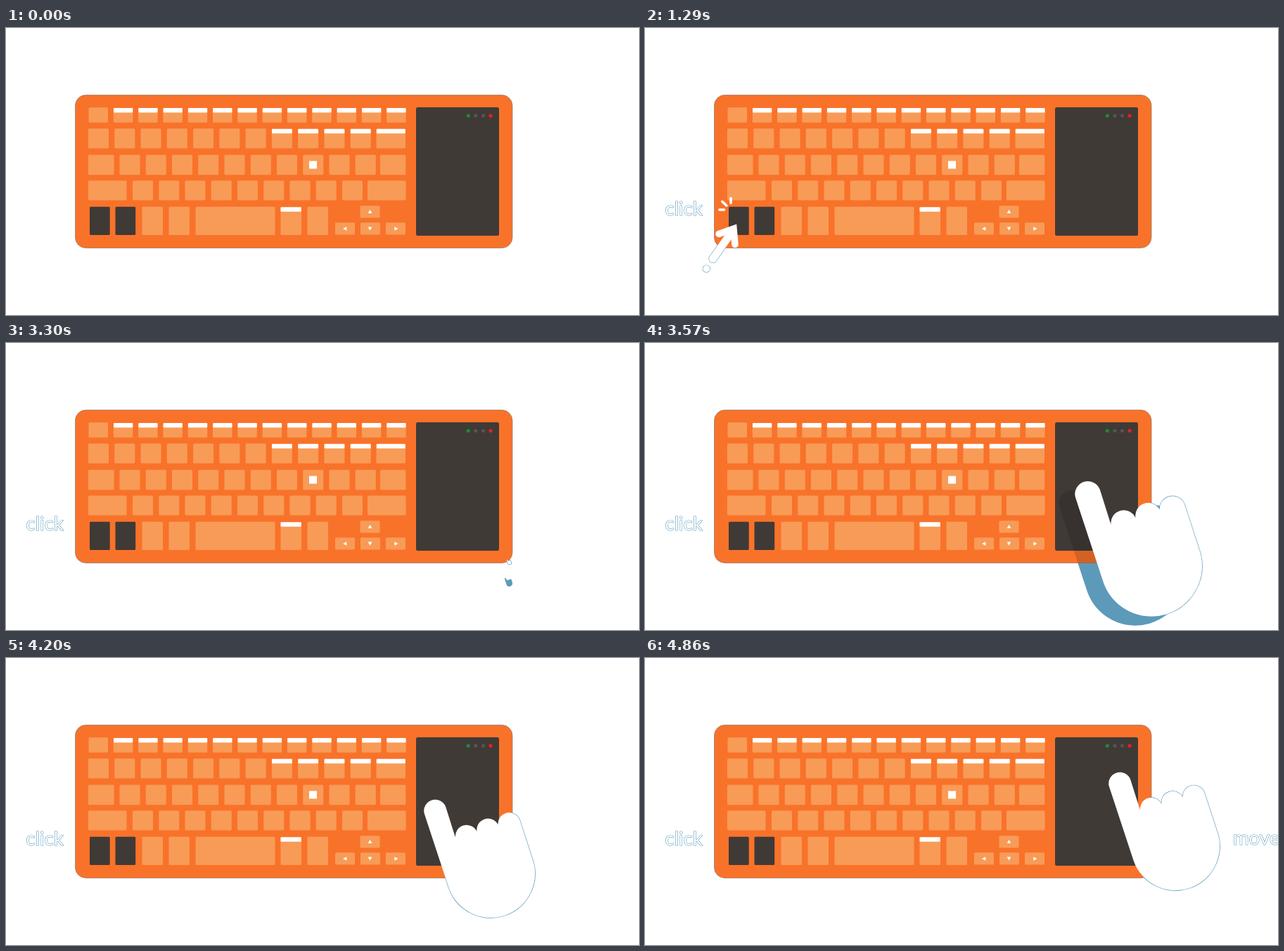
An HTML page for the animation above (5520 ms loop, 900x409 px).

```html
<!DOCTYPE html>
<html lang="en">
<head>
<meta charset="utf-8">
<title>Keyboard: click and move</title>
<style>
  html, body { margin: 0; width: 100%; height: 100%; overflow: hidden; background: #fff; }
  svg { display: block; width: 900px; height: 409px; }
  text { font: 27.5px Lato, sans-serif; fill: #fff; stroke: #5b9abd; stroke-width: 1.1px; paint-order: stroke; }
  .white { --grow: 0px; color: #fff; }
  .edge { --grow: 1.2px; color: #5b9abd; }
  .edge.hand, .white.hand { fill: currentColor; stroke: currentColor; }
  .edge.hand { stroke-width: 1.2px; }
  .white.hand { stroke-width: 0; }
  #arrowShape { fill: none; stroke: currentColor; stroke-linecap: round; }
  #arrowShape .head { stroke-width: calc(9.5px + var(--grow)); }
  #arrowShape .shaft { stroke-width: calc(11px + var(--grow)); }
  #arrowShape circle { fill: currentColor; stroke-width: var(--grow); }
</style>
</head>
<body>
<svg viewBox="0 0 900 409">
  <defs>
    <path id="handShape" vector-effect="non-scaling-stroke" d="M594.7 221.6A16 16 0 0 1 625.3 212.4L639 256A16 16 0 0 1 669.5 247.5A16 16 0 0 1 699.5 237.5A16 16 0 0 1 730.3 230.4L750.3 292A63 63 0 0 1 629.7 328Z"/>
    <g id="arrowShape">
      <path class="shaft" d="M121 294L96.5 329"/>
      <path class="head" d="M105 293.5L126 286L128 308.5"/>
      <circle cx="87.3" cy="343" r="5"/>
    </g>
    <clipPath id="board"><rect x="98.5" y="95.5" width="621.5" height="218" rx="15"/></clipPath>
    <clipPath id="view"><rect width="900" height="403"/></clipPath>
  </defs>

  <g clip-path="url(#view)"><use class="shade" href="#handShape" fill="#5d9aba"/></g>
  <use class="edge hand" href="#handShape"/>
  <use class="edge arrow" href="#arrowShape"/>

  <rect x="98.5" y="95.5" width="621.5" height="218" rx="15" fill="#f9722a" stroke="#8b7668" stroke-width=".7"/>
  <g id="keys"></g>

  <g clip-path="url(#board)"><use class="shade" href="#handShape" opacity=".15"/></g>
  <use class="white arrow" href="#arrowShape"/>
  <path id="marks" d="M105.8 259H112.5M109.8 247.3L115.8 253M122 242.5V249.5" fill="none" stroke="#fff" stroke-width="3.6" stroke-linecap="round"/>
  <use class="white hand" href="#handShape"/>
  <text id="click" x="28.5" y="267">click</text>
  <text id="move" x="836" y="266">move</text>
</svg>
<script>
const LOOP = 5520;
const KEY = '#f89b57', DARK = '#403a37';
const $$ = s => document.querySelectorAll(s);
const $ = s => document.querySelector(s);

// Keyboard
let parts = '';
const box = (x, y, w, h, fill = KEY, r = 1.5) =>
  parts += `<rect x="${x}" y="${y}" width="${w}" height="${h}" rx="${r}" fill="${fill}"/>`;
const row = (x, y, w, h, step, n) => {
  for (let i = 0; i < n; i++) box(x + i * step, y, w, h);
};
const bars = (x, y, w, step, n) => {
  for (let i = 0; i < n; i++) {
    box(x + i * step - .3, y - 1, w + .6, 3, '#f9722a', 0);
    box(x + i * step, y, w, 6.5, '#fff', 1);
  }
};
row(117.5, 113.3, 27.5, 21.4, 35.3, 13);
bars(153, 114, 27.3, 35.3, 12);
row(117, 143.2, 29, 28.3, 37.27, 11);
box(526.5, 143.2, 41.5, 28.3);
bars(378, 143.8, 28.8, 37.27, 4);
bars(526.8, 143.8, 41, 0, 1);
box(117, 180.7, 36.5, 28.5);
row(161.5, 180.7, 29, 28.5, 37.25, 10);
box(532, 180.7, 36.3, 28.5);
box(117, 217.5, 54.5, 28);
row(180, 217.5, 29, 28, 37.25, 9);
box(514, 217.5, 54.5, 28);
box(119, 254.8, 28.7, 40.2, DARK);
box(155.5, 254.8, 28.7, 40.2, DARK);
row(193.5, 254.8, 29.5, 40.2, 38, 2);
box(269.5, 254.8, 113, 40.2);
row(390.5, 254.8, 29.5, 40.2, 38, 2);
bars(390.5, 255.2, 29.3, 0, 1);
box(503.5, 253.3, 28, 17.3);
row(468, 277.3, 28, 17.3, 36, 3);
[[517.5, 261.6, 0], [554.8, 286, 90], [517.5, 286, 180], [481.8, 286, 270]].forEach(([x, y, a]) =>
  parts += `<path d="M0-2.7L2.8 2.5H-2.8Z" fill="#fff" transform="translate(${x} ${y}) rotate(${a})"/>`);
box(431, 189.5, 11, 11, '#fff', 0);
box(583, 113, 118, 183, DARK, 2.5);
['#1c8b3b', '#575352', '#575352', '#e8201f'].forEach((c, i) =>
  parts += `<circle cx="${657.3 + i * 10.6}" cy="125" r="2.6" fill="${c}"/>`);
$('#keys').innerHTML = parts;

// Motion
const progress = (t, a, b) => Math.min(1, Math.max(0, (t - a) / (b - a)));
const inOut = p => p < .5 ? 4 * p ** 3 : 1 - (2 - 2 * p) ** 3 / 2;
const out = p => 1 - (1 - p) ** 3;

// Steps: [time, x, y, scale], placed by the fingertip's top left corner
const handSteps = [[3300, 712, 309, .04], [3570, 611, 196, 1.145], [3840, 611, 196, 1.145],
  [4180, 594, 201, 1], [4235, 594, 201, 1], [4860, 659, 162, 1]];
const shadeSteps = [[3300, 709, 335, .07], [3570, 588, 209, 1.145], [3840, 588, 209, 1.145],
  [4180, 594, 201, 1], [4235, 594, 201, 1], [4860, 659, 162, 1]];

function pose(steps, t) {
  let i = 0;
  while (i < steps.length - 2 && t >= steps[i + 1][0]) i++;
  const a = steps[i], b = steps[i + 1];
  const p = inOut(progress(t, a[0], b[0]));
  const [x, y, s] = [1, 2, 3].map(k => a[k] + (b[k] - a[k]) * p);
  return `translate(${x} ${y}) scale(${s}) translate(-594 -201)`;
}

function set(sel, shown, transform) {
  $$(sel).forEach(el => {
    el.style.display = shown ? '' : 'none';
    if (transform) el.setAttribute('transform', transform);
  });
}

const within = (t, a, b) => t >= a && t < b;

function draw(t) {
  const pressed = within(t, 480, 810) || within(t, 1290, 1680) || within(t, 2160, 2520);
  const size = t < 480 ? .95 * out(progress(t, 0, 450)) : pressed ? 1 : .95;
  set('.arrow', within(t, 30, 2550), `translate(130 281) scale(${size}) translate(-130 -281)`);
  set('#marks', pressed);
  set('.hand', t >= 3300, pose(handSteps, t));
  set('.shade', within(t, 3300, 4180), pose(shadeSteps, t));
  set('#click', t >= 30);
  $('#click').style.opacity = progress(t, 0, 300);
  set('#move', t >= 4440);
  $('#move').style.opacity = progress(t, 4420, 4720);
}

const start = performance.now();
function tick() {
  const t = (performance.now() - start) % LOOP;
  draw(Math.floor(t / 30) * 30);
  requestAnimationFrame(tick);
}
draw(0);
requestAnimationFrame(tick);
</script>
</body>
</html>
```
